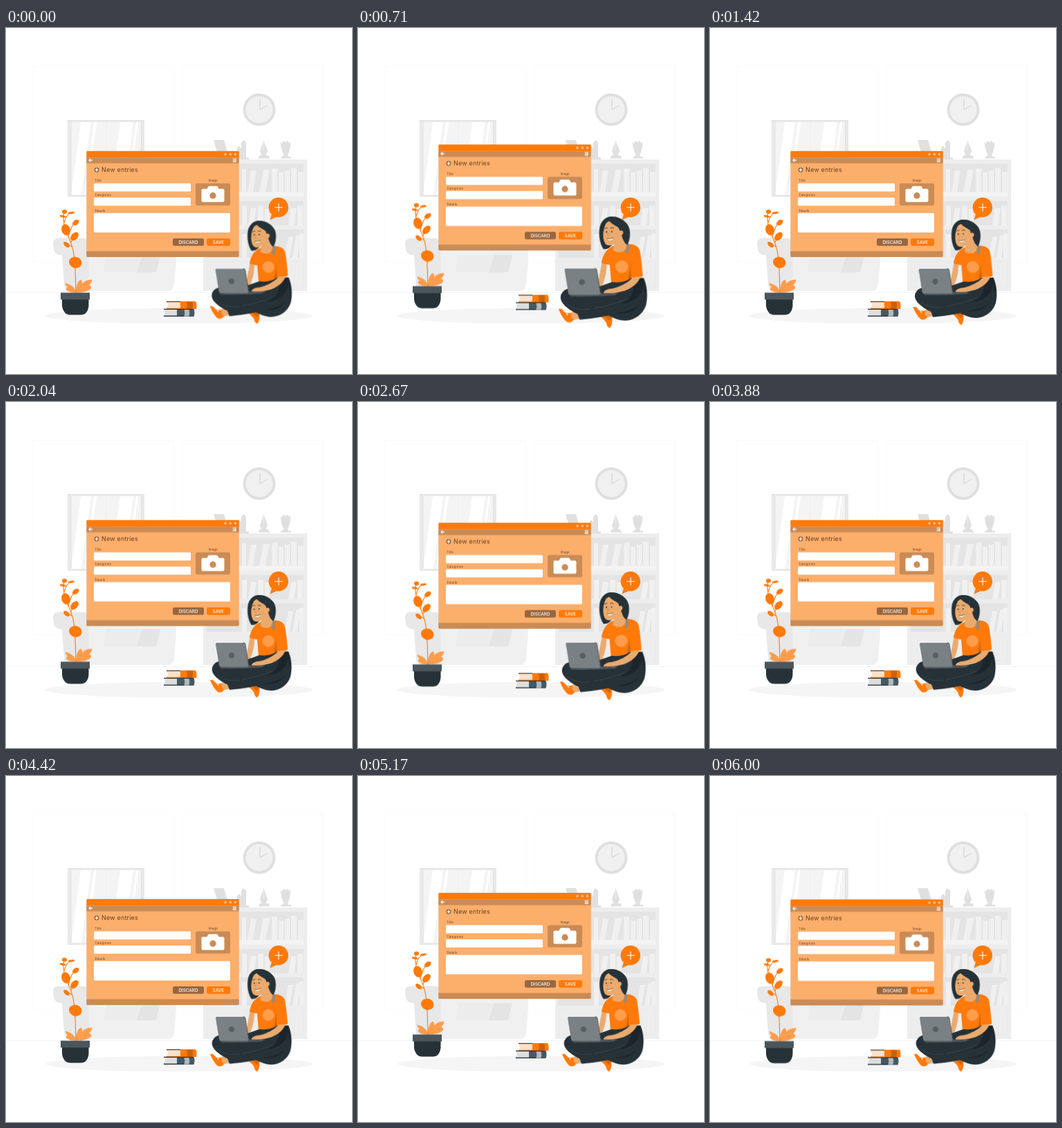
An HTML page for the animation above (6040 ms loop, 500 by 500 pixels).

```html
<!DOCTYPE html>
<html lang="en">
<head>
<meta charset="utf-8">
<title>New entries</title>
<style>
  html, body { margin: 0; width: 100%; height: 100%; overflow: hidden; background: #fff; }
  svg { display: block; width: 100vw; height: 100vh; }
  text { font-family: Inter, "Open Sans", sans-serif; }

  .float { animation: float 6040ms linear infinite; }
  .beat { transform-origin: 354px 352.5px; animation: beat 6040ms linear infinite; }

  /* four bobs of 1500 ms */
  @keyframes float {
    0% { transform: translateY(-.4px); }
    11.755%, 36.589%, 61.424%, 86.258% { transform: translateY(-9.9px); }
    24.172%, 49.007%, 73.841%, 98.675%, 100% { transform: translateY(.1px); }
  }
  @keyframes beat {
    0% { transform: scale(1.0067); }
    9.272%, 49.007% { transform: scale(1.1); }
    29.139%, 39.073%, 58.94%, 100% { transform: scale(1); }
  }

  .orange { fill: #ff7a0a; }
  .pale { fill: #ff9d4c; }
  .tan { fill: #ca8b55; }
  .dark { fill: #263238; }
  .skin { fill: #eaaa6e; }
  .white { fill: #fff; }
  .label { font-size: 4.2px; fill: #5f3d20; letter-spacing: .2px; }
  .button { font-size: 6.3px; font-weight: 500; fill: #fff; text-anchor: middle; }
  .line { fill: none; stroke-linecap: round; stroke-linejoin: round; }
</style>
</head>
<body>
<svg viewBox="0 0 500 500">
  <!-- room -->
  <g fill="none" stroke="#f7f7f7" stroke-width=".7">
    <rect x="39" y="55.5" width="203.5" height="282" rx="1"/>
    <rect x="255" y="55.5" width="203" height="282" rx="1"/>
  </g>
  <path d="M0 382.3H500" stroke="#ededed" stroke-width=".6"/>

  <!-- window -->
  <path fill="#e9e9e9" d="M89 133H200V244H89z"/>
  <path fill="#f4f4f4" d="M95 136H196V241H95z"/>
  <path class="white" d="M108 136H123L109 241H95V234zM127 136H131L117 241H113zM165 136H184L170 241H151zM188 136H191L177 241H174z"/>
  <path fill="#f0f0f0" d="M144 136H146V241H144z"/>
  <path fill="#e2e2e2" d="M195 136H196.500V241H195zM89 133H200V134H89z"/>

  <!-- clock -->
  <circle cx="366" cy="118" r="23.5" fill="#dfdfdf"/>
  <circle cx="366" cy="118" r="19.6" fill="#f0f0f0"/>
  <path class="line" d="M367 103.500V118L377.500 112" stroke="#d8d8d8" stroke-width="1.3"/>

  <!-- armchair -->
  <path fill="#f0f0f0" d="M112 318H246V334L243 371Q242 380 234 380H114z"/>
  <path fill="#ececec" d="M145 328H223L217 353H141z"/>
  <path fill="#e4e4e4" d="M197 328H223L217 353H189z"/>
  <path fill="#e8e8e8" d="M68 313Q67 304 76 303.500H112Q119 304 119 312L120 380H92Q85 380 84 371L81 328Q69 330 68 313z"/>

  <!-- bookshelf -->
  <path fill="#ededed" d="M285 190H435V380H285z"/>
  <path fill="#e4e4e4" d="M290 196H430V237H290zM290 250H430V285H290zM290 291H430V332H290z"/>
  <path fill="#f3f3f3" d="M290 237H430V243.500H290z"/>
  <path class="line" d="M290 338H430V374H290z" stroke="#e6e6e6" stroke-width=".6"/>
  <g id="books" fill="#f0f0f0"></g>

  <!-- things on the shelf -->
  <g fill="#e0e0e0">
    <path d="M300 162H315L323 190H308z"/>
    <path d="M334 190V174L336.500 170L340 174V166L343.500 162L347 166V187H351V190z"/>
    <path d="M372.500 162L378 178L375.500 184H379Q381 186 381 188.500H365Q365 186 367 184H369.500L367 178z"/>
    <path d="M396.500 164Q398 169 400 164Q402 161 404 166Q406 161 408 164Q409.500 168 411.500 164Q410 181 406.500 184H408V186H412V188.500H397V186H400V184H402Q398 180 396.500 164z"/>
  </g>
  <path class="line" d="M372.500 164V177" stroke="#f7f7f7" stroke-width=".7"/>

  <ellipse cx="250" cy="416" rx="193.500" ry="11.300" fill="#f5f5f5"/>

  <g class="float">
    <!-- form -->
    <path fill="#fcae6b" d="M116.300 190H336.700V326H116.300z"/>
    <path class="orange" d="M116.300 188V179.500Q116.300 178 118 178H335Q336.700 178 336.700 179.500V188z"/>
    <path class="tan" d="M116.300 187.700H336.700V196H116.300zM116.300 322.800H336.700V330Q336.700 331.500 335 331.500H118Q116.300 331.500 116.300 330z"/>
    <g fill="#fdb981">
      <circle cx="317" cy="182.800" r="1.900"/><circle cx="324.200" cy="182.800" r="1.900"/><circle cx="331.300" cy="182.800" r="1.900"/>
    </g>
    <path class="line" d="M124.500 191.600H120M122 189.600L119.900 191.600L122 193.600" stroke="#fff" stroke-width="1.200"/>
    <path d="M327.700 189.700H333M327.700 191.600H333M327.700 193.500H333" stroke="#fff" stroke-width="1.100"/>

    <circle cx="131" cy="205.500" r="3.600" fill="#9a683f"/>
    <path d="M128.700 205.500H133.300M131 203.200V207.800" stroke="#fff" stroke-width="1.300"/>
    <text x="138" y="208.400" font-size="9" letter-spacing=".18" fill="#68421f">New entries</text>

    <text class="label" x="128.500" y="222.800">Title</text>
    <text class="label" x="128.500" y="243.200">Categories</text>
    <text class="label" x="128.500" y="266">Details</text>
    <text class="label" x="299.300" y="222.800" text-anchor="middle">Image</text>
    <g class="white">
      <rect x="127" y="225" width="140" height="11.600" rx="1.500"/>
      <rect x="127" y="245.500" width="140" height="11.600" rx="1.500"/>
      <rect x="127" y="268" width="197" height="28" rx="1.500"/>
    </g>

    <rect class="tan" x="274" y="225" width="50" height="32" rx="2.500"/>
    <path class="white" d="M284 233H290.500L292 230Q292.500 229 294 229H304Q305.500 229 306 230L307.500 233H313.500Q315.500 233 315.500 235V250Q315.500 252 313.500 252H284.500Q282.500 252 282.500 250V235Q282.500 233 284 233z"/>
    <circle class="tan" cx="299" cy="242.600" r="4.600"/>

    <rect x="241" y="304.500" width="45" height="10.600" rx="2.500" fill="#98673f"/>
    <rect class="orange" x="290" y="304.500" width="34" height="10.600" rx="2.500"/>
    <text class="button" x="263.500" y="312.100">DISCARD</text>
    <text class="button" x="307" y="312.100">SAVE</text>

    <!-- plant -->
    <path class="pale" d="M101 383C100 375 94 371 85.500 369Q86 373 89 375Q86 376 87 379Q91 383 101 383zM101 383C101 372 104 366 108 364Q111 367 110 370Q115 364 124.500 364Q124 369 120 372Q124 373 123 377Q117 383 101 383z"/>
    <path class="line" d="M101 383C100 360 101 340 97 322C94 307 87 298 84 284C82 276 82 271 85 266M84 282Q87 270 94 267.500M90 303Q94 285 101 281M96 317Q92 314 88 313M94 311Q96 304 99 301" stroke="#ff7a0a" stroke-width="1.100"/>
    <g class="orange">
      <ellipse cx="84.500" cy="266" rx="3.600" ry="3"/>
      <ellipse cx="94.500" cy="267.500" rx="4.600" ry="1.700" transform="rotate(-6 94.500 267.500)"/>
      <ellipse cx="82" cy="272.500" rx="4.400" ry="1.600" transform="rotate(12 82 272.500)"/>
      <ellipse cx="100.800" cy="281.500" rx="5.300" ry="3.500" transform="rotate(-35 100.800 281.500)"/>
      <ellipse cx="86.500" cy="292" rx="6.300" ry="8.300" transform="rotate(-18 86.500 292)"/>
      <ellipse cx="99" cy="301.500" rx="7.200" ry="4.600" transform="rotate(-48 99 301.500)"/>
      <ellipse cx="87.500" cy="313.500" rx="5.200" ry="3" transform="rotate(42 87.500 313.500)"/>
      <path d="M91 338C92 331.500 99 330 104 332C109 334 111 340 108 344.500C105 347.500 103 346.500 100.500 348C95 346.500 91 343 91 338z"/>
    </g>
    <path class="dark" d="M81 391H119.500V402Q118 415 108 415H93Q83 415 81 402z"/>
    <path fill="#4b565c" d="M79 382.800H121V393H79z"/>

    <!-- books -->
    <path class="orange" d="M232 395.500H274Q276.500 400 275 406.500H232V405H251V397H232z"/>
    <path fill="#fae1cb" d="M233 397H252V405H233Q234.500 401 233 397z"/>
    <path fill="#cc6208" d="M261 396H269.500Q271 401 269.500 406H261Q262.500 401 261 396z"/>
    <path fill="#263238" d="M232 395.300H252V396.300H232z"/>
    <path fill="#455a64" d="M228 406.300H271.500Q273.500 411 271.500 417.300H228V416H247V407.500H228z"/>
    <path fill="#dedede" d="M229 407.500H247V416H229Q230.500 412 229 407.500z"/>
    <path fill="#b4b9bb" d="M257.500 407H264.500Q266 412 264.500 417H257.500Q259 412 257.500 407z"/>
    <path class="dark" d="M228 406.200H270V407.300H228zM228 416.200H257V417.300H228z"/>
  </g>

  <g class="beat">
    <!-- back hair, left arm, torso -->
    <path class="dark" d="M367 279C358 278 351 285 349.500 294C348 305 350 315 354.500 322C359 323 364 320 367 315L366 290z"/>
    <path class="skin" d="M352.500 340L359 343C358.500 354 357 362 352 373L347.500 372C348 360 350.500 352 352.500 340z"/>
    <path class="orange" d="M360 323C364 319 369 317 374 316.500L389 315.500C396 316 401 318 403 324C405 334 406 346 407 358C402 361 396 361 392 360L391 367H365L363 343C360 343 356 342 352 340.500C353 333 356 327 360 323z"/>
    <path class="skin" d="M369 307L383 301L385 317C385 326 376 329 368 324C367 321 369 318 369 315z"/>
    <path d="M385 316L389 315.500Q390 322 387 329L384 327Q386 321 385 316z" fill="#8c8c8c"/>
    <path fill="#d56608" d="M391 338Q390 350 392 360L391 367L387 362Q390 350 391 338z"/>
    <circle class="pale" cx="379" cy="345.500" r="8.500"/>

    <!-- head -->
    <path class="skin" d="M357 290C353.800 298 353.500 307 356 313C358.500 318.500 364 318.500 369 315C375 311 380 305 381 299C382 292 377 287 370 285C364 283.500 359 285 357 290z"/>
    <path class="dark" d="M354.500 297C355 291 358 286 362.500 285C366 289 371 291 374.500 293.500C376.500 296 376 299 378 302C380 307 381.500 314 386.500 316.500C390 310 391 300 388.500 293C385.500 285.500 376 279 367 279C357 279 350.500 288 351 300z"/>
    <path class="skin" d="M374.500 299Q379 295.500 381 299.500Q380.500 305 375.500 305z"/>
    <path class="line" d="M356.300 295Q358 293.400 359.800 294M364 294Q366.300 292.600 368.300 294.400" stroke="#263238" stroke-width=".8"/>
    <ellipse class="dark" cx="358.600" cy="299.300" rx=".8" ry="1.100"/>
    <ellipse class="dark" cx="365.700" cy="299" rx=".8" ry="1.100"/>
    <path class="line" d="M361.300 299L360 304L361.500 304.500" stroke="#c9804d" stroke-width=".5"/>
    <path class="white" d="M360 308.300Q364 309.600 367.500 307.500Q366 310.600 363 310.500Q361 310.200 360 308.300z"/>
    <path class="line" d="M359.600 308Q363.800 309.700 367.800 307.200" stroke="#263238" stroke-width=".5"/>

    <!-- legs -->
    <path class="skin" d="M309 407L321 403L325 414L312 417z"/>
    <path class="orange" d="M295 402Q299 400 302 405Q307 408 312 407Q310 411 315 416Q312 421 306 419Q300 414 295 402z"/>
    <path class="line" d="M303 405L307 410L306 405" stroke="#fff" stroke-width=".8"/>
    <path class="orange" d="M350 411L365 406Q367 414 366 420Q365 426 362.500 427Q359 425 358.500 420Q355 415 350 411z"/>
    <path fill="#d56608" d="M356 410L365 407Q366 412 363.500 417Q359 416 356 410z"/>
    <path class="dark" d="M366 366Q380 368 391 361L408 360.500C413 371 414 386 411 397C407 409 396 416.500 384 417C374 417 366 413 357 408L330 412Q315 408 304 398Q296 391 298 383Q301 375 312 374L340 375z"/>
    <path fill="#1c252a" d="M391 361Q400 374 388 389Q374 399 354 402Q374 412 392 405Q408 396 411 376Q411 368 408 360.500z"/>
    <path class="dark" d="M408 369Q405 388 385 394Q356 399 319 405L323 416Q354 413 374 407Q399 404 410 388z"/>
    <path class="line" d="M306 395Q318 405 337 402M341 401Q368 397 385 388" stroke="#46535a" stroke-width=".6"/>

    <!-- near arm -->
    <path class="skin" d="M394 359.500L404 358.500C401 367 393 374 383 377.500L366 381.500L355 380Q358 376 365 375Q383 371 394 359.500z"/>

    <!-- laptop -->
    <path fill="#4d565b" d="M309 383.500L349 380.500H375L370 383.500Q340 386 311 385z"/>
    <path fill="#7a8185" d="M304.500 348H343Q345 348 345.500 350L350.500 380Q350.500 383 348 383H311Q308.500 383 308 381L303 350Q303 348 304.500 348z"/>
    <path class="line" d="M343 347.800Q345.200 348 345.700 350L350.600 380.500" stroke="#4d565b" stroke-width="1"/>
    <circle cx="326" cy="366" r="4" fill="#555e63"/>
    <path class="skin" d="M355 379Q360 374 367 375L373 378Q366 381 355 380.500z"/>
  </g>

  <!-- bubble -->
  <path class="orange" d="M384 269L381.500 277.500L391 273z"/>
  <circle class="orange" cx="393.800" cy="259.200" r="14.200"/>
  <path d="M388 259.200H399.800M394 253.400V265" stroke="#fff" stroke-width="1.100"/>
</svg>

<script>
  // each book: left, width, height, lean
  const shelves = [
    { y: 237, books: [[341, 6, 33, 0], [349, 8, 31, 5], [366, 9, 32, 6], [384, 8, 34, 0], [394, 7, 28, 0], [403, 7, 31, 0], [412, 8, 35, 0], [422, 8, 29, 0]] },
    { y: 285, books: [[341, 7, 28, 0], [350, 8, 25, 4], [364, 8, 28, 0], [374, 7, 24, 0], [408, 8, 25, 4], [421, 8, 28, 0]] },
    { y: 332, books: [[341, 7, 34, 0], [403, 7, 30, 5], [414, 7, 32, 5], [424, 6, 35, 0]] }
  ];
  const group = document.getElementById('books');
  for (const { y, books } of shelves) {
    for (const [x, w, h, lean] of books) {
      const path = document.createElementNS('http://www.w3.org/2000/svg', 'path');
      path.setAttribute('d', `M${x} ${y}h${w}l${lean} ${-h}h${-w}z`);
      group.append(path);
    }
  }
</script>
</body>
</html>
```
